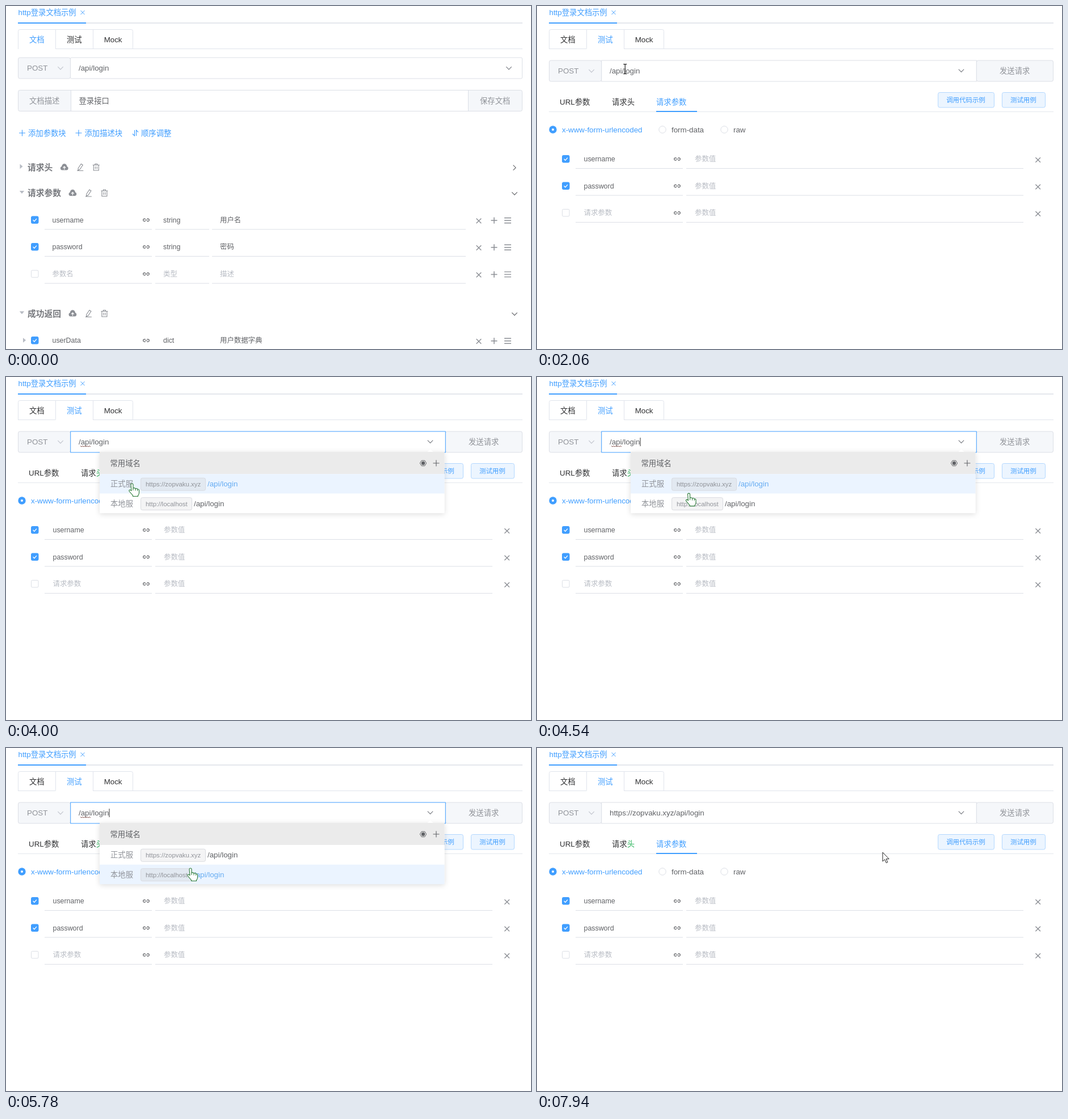
An HTML page that plays this animation: 925 by 605 pixels, repeating every 8000 ms.

```html
<!DOCTYPE html>
<html lang="zh">
<head>
<meta charset="utf-8">
<title>API</title>
<style>
html, body { margin: 0; width: 100%; height: 100%; overflow: hidden; background: #fff; }
svg { display: block; width: 100vw; height: 100vh; }
text { font-family: "Liberation Sans", "Noto Sans CJK SC", "Noto Sans CJK", sans-serif; white-space: pre; }
</style>
</head>
<body>
<svg id="stage" viewBox="0 0 925 605"></svg>
<script>
const BLUE = '#409eff', DARK = '#303133', TEXT = '#606266', GRAY = '#909399',
      PALE = '#b8bcc4', BORDER = '#dcdfe6', PANEL = '#f5f7fa', ICON = '#8c8f95';
const API = '/api/login', HOST = 'https://zopvaku.xyz';
const M = 13.34, S = 12.4, XS = 11.44;

// Drawing helpers; text is placed by its left edge and vertical centre.
const text = (x, y, s, color = TEXT, size = M, extra = '') =>
  `<text x="${x}" y="${y + size * .355}" font-size="${size}" fill="${color}" ${extra}>${s}</text>`;
const box = (x, y, w, h, fill = '#fff', stroke = BORDER, r = 0, extra = '') =>
  `<rect x="${x}" y="${y}" width="${w}" height="${h}" rx="${r}" fill="${fill}" stroke="${stroke}" ${extra}/>`;
const line = (x1, x2, y, color = BORDER, w = 1) =>
  `<path d="M${x1} ${y}H${x2}" stroke="${color}" stroke-width="${w}"/>`;
const group = (id, content, extra = '') => `<g id="${id}" ${extra}>${content}</g>`;

const strokes = {
  close: 'M-4.3-4.3l8.6 8.6m0-8.6l-8.6 8.6',
  smallClose: 'M-3.5-3.5l7 7m0-7l-7 7',
  plus: 'M-5.5 0h11M0-5.5v11',
  menu: 'M-6-4.5h12M-6 0h12M-6 4.5h12',
  down: 'M-4.7-2.4l4.7 4.8 4.7-4.8',
  right: 'M-2.4-4.5l4.5 4.5-4.5 4.5',
  link: 'M-1.2-2.1h-2a2.1 2.1 0 0 0 0 4.2h2M1.2-2.1h2a2.1 2.1 0 0 1 0 4.2h-2M-2.3 0h4.6',
  pencil: 'M-3.5 1.5L1.5-6l3 2-5 7.5-3.5 1.7zM-5.5 6h11',
  trash: 'M-6-4h12M-2-4v-2h4v2M-4.5-4v9.5h9v-9.5M-1.5-1.5v4.5M1.5-1.5v4.5',
  sort: 'M-1.5-5v10l-3.5-3.5M1.5 5v-10l3.5 3.5',
  tick: 'M-3 0l2.3 2.4 4-4.6',
};
const icon = (name, x, y, color = ICON, w = 1.1) =>
  `<path d="${strokes[name]}" transform="translate(${x} ${y})" fill="none" stroke="${color}" stroke-width="${w}"/>`;
const triangle = (x, y, open) =>
  `<path d="M-2.5-4.2L2.5 0l-5 4.2z" transform="translate(${x} ${y}) rotate(${open ? 90 : 0})" fill="${PALE}"/>`;
const cloud = (x, y) => `<g transform="translate(${x} ${y})">
  <path d="M-4 5a3.4 3.4 0 0 1-.6-6.6a4.6 4.6 0 0 1 9.2 0a3.4 3.4 0 0 1-.6 6.6z" fill="${ICON}"/>
  <path d="M0 4v-5M-2.3 1L0-1.4 2.3 1" fill="none" stroke="#fff" stroke-width="1.2"/></g>`;
const checkbox = (y, on) =>
  box(44.5, y - 6.5, 12.5, 12.5, on ? BLUE : '#fff', on ? BLUE : BORDER, 2) +
  (on ? icon('tick', 50.6, y - .2, '#fff', 1.3) : '');
const radio = (x, label, on) => on
  ? `<circle cx="${x}" cy="218" r="6.7" fill="${BLUE}"/><circle cx="${x}" cy="218" r="2" fill="#fff"/>` + text(x + 16, 218, label, BLUE)
  : `<circle cx="${x}" cy="218" r="6.2" fill="#fff" stroke="${BORDER}"/>` + text(x + 16, 218, label);

function tabs(active) {
  const gap = active ? [87.5, 153] : [22, 87];
  return '<path d="M21.5 75.5v-31a3 3 0 0 1 3-3h196a3 3 0 0 1 3 3v31M87.5 41.5v34M153.5 41.5v34" fill="none" stroke="#e0e4ec"/>' +
    line(21, 910, 75.5, '#e0e4ec') + line(...gap, 75.5, '#fff', 1.4) +
    text(41, 59, '文档', active ? DARK : BLUE) +
    text(107, 59, '测试', active ? BLUE : DARK, M, active ? '' : 'id="testTab"') +
    text(172.7, 59, 'Mock', DARK);
}
const method = y => box(21.5, y - 18.5, 92, 37, PANEL, BORDER, 3) +
  text(37, y, 'POST', GRAY) + icon('down', 96, y, '#c0c4cc');

function section(y, label, open = true) {
  const x = 44 + 14.6 * label.length;
  return triangle(open ? 28 : 27, y - 1.5, open) +
    text(38, y, label, '#77797e', 14.75, 'font-weight="bold"') +
    cloud(x + 15, y) + icon('pencil', x + 43, y) + icon('trash', x + 71, y) +
    icon(open ? 'down' : 'right', 896, y + .7, TEXT);
}
function docRow(y, on, name, type, note) {
  const color = on ? TEXT : PALE;
  return checkbox(y, on) + text(81.5, y, name, color, S) + icon('link', 247, y, TEXT, 1.2) +
    text(277, y, type, color, S) + text(377, y, note, color, S) +
    line(68, 257, y + 16.5) + line(263, 358, y + 16.5) + line(363, 810, y + 16.5) +
    icon('close', 833, y + 1.5, ICON, 1.4) + icon('plus', 860, y + .7, ICON, 1.5) + icon('menu', 884, y + .7, ICON, 1.4);
}
const testRow = (y, on, name) => checkbox(y, on) +
  text(82.5, y, name, on ? TEXT : PALE, S) + icon('link', 247, y, TEXT, 1.2) +
  text(278, y, '参数值', PALE, S) + line(68, 257, y + 16.5) + line(263, 857, y + 16.5) +
  icon('close', 882.7, y + 1.5, ICON, 1.4);
const button = (x, w, label) => box(x, 152.5, w, 26.5, '#ecf5ff', '#b3d8ff', 3) +
  text(x + 14.5, 165.5, label, BLUE, XS);

const docPage = tabs(0) + method(109.5) +
  box(113.5, 91, 796, 37, '#fff', BORDER, 2, 'id="docInput"') + text(128, 109.5, API) + icon('down', 886, 109.5, '#777a80') +
  box(21.5, 148.5, 888, 37, PANEL, BORDER, 3) + box(114.5, 148.5, 700, 37) +
  text(41, 167, '文档描述', GRAY) + text(128.5, 167, '登录接口') + text(835, 167, '保存文档', GRAY) +
  icon('plus', 28.5, 224, BLUE) + text(39, 224, '添加参数块', BLUE) +
  icon('plus', 128, 224, BLUE) + text(138.5, 224, '添加描述块', BLUE) +
  icon('sort', 228, 224, BLUE) + text(238, 224, '顺序调整', BLUE) +
  section(284.5, '请求头', false) + section(330, '请求参数') +
  docRow(377.5, 1, 'username', 'string', '用户名') + docRow(425, 1, 'password', 'string', '密码') +
  docRow(472.7, 0, '参数名', '类型', '描述') + section(542.5, '成功返回') +
  triangle(32.5, 589.5) + docRow(590, 1, 'userData', 'dict', '用户数据字典');

const testPage = tabs(1) + method(114.5) +
  box(774.5, 96, 135, 37, PANEL, BORDER, 3) + text(815, 114, '发送请求', GRAY) +
  box(113.7, 96, 660.6, 37, '#fff', BORDER, 0, 'id="urlInput"') +
  text(128, 114, API, TEXT, M, 'id="url"') + icon('down', 747.5, 114, '#777a80') +
  group('focusMarks', '<path d="M131 121.5l2 1.5 2-1.5 2 1.5 2-1.5 2 1.5 2-1.5 2 1.5 2-1.5 2 1.5" fill="none" stroke="#85524d"/>' +
    '<path id="caret" d="M182 107v15" stroke="#333"/>') +
  text(40, 169.6, 'URL参数', DARK) + text(132, 169.6, '请求<tspan id="headTail">头</tspan>', DARK) +
  text(210, 169.6, '请求参数', BLUE) +
  line(21, 910, 186.5, '#e4e7ed') + line(210, 282, 186, BLUE, 2) +
  button(706.7, 98.8, '调用代码示例') + button(819.5, 76, '测试用例') +
  radio(28, 'x-www-form-urlencoded', 1) + radio(221, 'form-data') + radio(330, 'raw') +
  testRow(270, 1, 'username') + testRow(317.5, 1, 'password') + testRow(365, 0, '请求参数');

const option = (i, label, host, tagWidth) => {
  const y = 188.7 + 34.5 * i;
  return `<g class="option"><rect x="165" y="${y - 17.5}" width="607.5" height="34.5" fill="#fff"/>` +
    text(184, y, label, GRAY) + box(237.5, y - 10.5, tagWidth, 22, '#f4f4f5', '#d9dbe0', 3) +
    text(246, y + .5, host, GRAY, XS) + text(241 + tagWidth, y, API) + '</g>';
};
const dropdown = '<rect x="165" y="132" width="607.5" height="108" rx="2" fill="#fff" style="filter:drop-shadow(0 2px 5px #0002)"/>' +
  '<path d="M742 132.5l5.5-5 5.5 5z" fill="#fff"/><rect x="165" y="132" width="607.5" height="39" fill="#ebebeb"/>' +
  text(183.5, 152.5, '常用域名') +
  `<path d="M732.2 147.3h5.6l2.8 4.7-2.8 4.7h-5.6l-2.8-4.7z" fill="none" stroke="${TEXT}"/><circle cx="735" cy="152" r="3.2" fill="${TEXT}"/>` +
  icon('plus', 758, 152, TEXT) + option(0, '正式服', HOST, 114) + option(1, '本地服', 'http://localhost', 90);

const cursors = {
  arrow: '<path d="M0 0v16l3.7-3.4 2.6 6 2.5-1.1-2.6-5.8h5z" fill="#fff" stroke="#222"/>',
  beam: '<path d="M-3-8.5h2.3l.7.8.7-.8H3M0-7.7V7.7M-3 8.5h2.3l.7-.8.7.8H3" fill="none" stroke="#222" stroke-width="1.2"/>',
  hand: '<path d="M-2 2a2 2 0 0 1 4 0v6q3-1 4 1 3-1 4 1 2.5-.3 2.5 2v4q0 3-2 5v1.5h-9v-1.5l-6-7q-1.5-2 .5-3 1.5-.3 3 2z" fill="#fff" stroke="#2b7a38" stroke-width="1.1"/>' +
    '<path d="M2 8v4M6 9v3.5M9.7 10v3" stroke="#2b7a38"/>',
};

const $ = id => document.getElementById(id);
$('stage').innerHTML =
  text(21.5, 11.5, 'http登录文档示例', BLUE) + icon('smallClose', 135, 11.5, BLUE, 1) +
  line(21, 910, 30, '#e4e7ed', 1.9) + line(21, 141, 30, BLUE, 1.9) +
  group('docPage', docPage) + group('testPage', testPage) + group('dropdown', dropdown) +
  group('cursor', Object.keys(cursors).map(k => group(k, cursors[k])).join(''));
const options = [...document.querySelectorAll('.option')];

// Pointer path: time, x, y and the shape worn from then on.
const path = [
  [70, 32, 586, 'arrow'], [500, 100, 240, 'arrow'], [620, 122, 172, 'beam'], [760, 126, 108, 'beam'],
  [840, 121, 66, 'hand'], [1070, 121, 64, 'hand'], [1600, 121, 64, 'hand'], [1850, 134, 88, 'arrow'],
  [1940, 146, 104, 'beam'], [2060, 155, 111, 'beam'], [2250, 195, 134, 'arrow'], [2400, 230, 155, 'hand'],
  [2600, 262, 159, 'hand'], [2750, 272, 133, 'beam'], [2910, 277, 125, 'beam'], [3080, 277, 124, 'beam'],
  [3330, 277, 124, 'beam'], [3600, 262, 150, 'arrow'], [3780, 240, 178, 'hand'], [4000, 222, 188, 'hand'],
  [4150, 222, 188, 'hand'], [4500, 262, 204, 'hand'], [4930, 320, 216, 'hand'], [5080, 322, 215, 'hand'],
  [5470, 324, 213, 'hand'], [5700, 324, 213, 'hand'], [5780, 325, 212, 'hand'], [6240, 326, 212, 'hand'],
  [6780, 214, 190, 'hand'], [7080, 209, 190, 'arrow'], [7640, 209, 192, 'arrow'], [7800, 390, 212, 'arrow'],
  [7940, 609, 184, 'arrow'], [8000, 609, 184, 'arrow'],
];
const progress = (t, from, to) => Math.min(1, Math.max(0, (t - from) / (to - from)));
const easeOut = p => 1 - (1 - p) ** 3;
function mix(a, b, p) {
  const part = (c, i) => parseInt(c.slice(i, i + 2), 16);
  return `rgb(${[1, 3, 5].map(i => Math.round(part(a, i) + (part(b, i) - part(a, i)) * p))})`;
}
const show = (id, on) => $(id).style.display = on ? '' : 'none';
const paint = (el, name, color) => el.setAttribute(name, color);

function pointer(t) {
  const i = Math.max(0, path.findIndex(k => k[0] > t) - 1);
  const [t0, x0, y0, shape] = path[i], [t1, x1, y1] = path[i + 1];
  const p = progress(t, t0, t1);
  return { x: x0 + (x1 - x0) * p, y: y0 + (y1 - y0) * p, shape };
}

function render(t) {
  const { x, y, shape } = pointer(t);
  show('cursor', t >= 70);
  $('cursor').setAttribute('transform', `translate(${x} ${y})`);
  for (const k in cursors) show(k, k === shape);

  show('docPage', t < 1600);
  show('testPage', t >= 1600);
  paint($('testTab'), 'fill', mix(DARK, BLUE, progress(t, 840, 1070)));
  paint($('docInput'), 'stroke', t > 700 && t < 820 ? '#c0c4cc' : BORDER);

  const focused = t >= 3300 && t < 6930;
  show('focusMarks', focused);
  show('caret', (t - 3300) % 1000 < 500);
  $('url').textContent = t < 6930 ? API : HOST + API;
  paint($('urlInput'), 'stroke',
    t < 3300 ? mix(BORDER, '#b4b8c0', progress(t, 2750, 2910)) :
    t < 6930 ? mix('#b4b8c0', BLUE, progress(t, 3310, 3500)) : mix(BLUE, BORDER, progress(t, 6930, 7130)));
  paint($('headTail'), 'fill', t > 3500 ? '#2db55d' : DARK);

  const open = t < 6930 ? easeOut(progress(t, 3350, 3650)) : 1 - easeOut(progress(t, 6930, 7230));
  show('dropdown', open > 0);
  $('dropdown').setAttribute('opacity', open);
  $('dropdown').setAttribute('transform', `translate(0 ${132 * (1 - open)}) scale(1 ${open})`);
  options.forEach((el, i) => {
    const [row, tag] = el.querySelectorAll('rect');
    const hover = t > 3700 && y > 171 && (y > 206) == i;
    paint(row, 'fill', hover ? '#ebf4ff' : '#fff');
    paint(tag, 'fill', hover ? '#e2e9f1' : '#f4f4f5');
    paint(el.lastElementChild, 'fill', hover ? '#66acf2' : TEXT);
  });
}

const start = performance.now();
function tick() {
  render((performance.now() - start) % 8000);
  requestAnimationFrame(tick);
}
tick();
</script>
</body>
</html>
```
